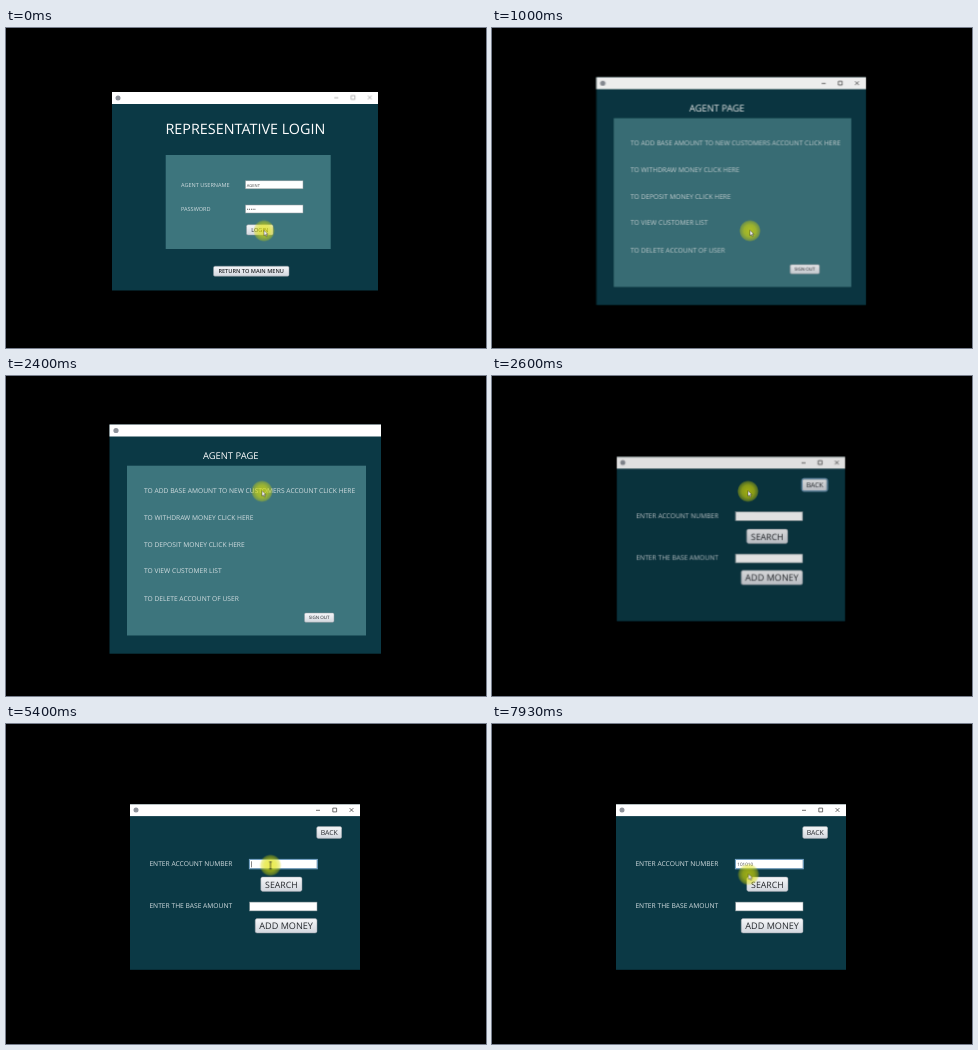
An HTML page that plays this animation: 480x320 px, repeating every 8000 ms.

```html
<!DOCTYPE html>
<html lang="en">
<head>
<meta charset="utf-8">
<title>Account desk</title>
<style>
  html, body { margin: 0; width: 100%; height: 100%; overflow: hidden; background: #000; }
  svg { display: block; width: 100vw; height: 100vh; }
  text { font-family: "Open Sans", "Noto Sans", sans-serif; fill: #d3dee1; text-rendering: geometricPrecision; }

  .body { fill: #0b3945; }
  .bar { fill: #fff; }
  .panel { fill: #3d757d; }
  .logo { fill: #8d929a; }
  .glyphs { fill: none; stroke: #333; stroke-width: .7; }
  .soft { stroke: #999; }
  .title { fill: #fff; }
  .field { fill: #fff; stroke: #8e979c; stroke-width: .5; }
  .ring { fill: none; stroke: #74a3c8; stroke-width: 1; }
  .button rect { fill: url(#face); stroke: #8c949d; stroke-width: .5; }
  .button text { fill: #25282c; text-anchor: middle; }
  .value { fill: #444; }

  /* One shared 8 s clock */
  .win, .run { animation: 8s linear infinite both; }
  .win { transform-box: fill-box; transform-origin: center; }
  .login { animation-name: login; }
  .menu { animation-name: menu; }
  .money { animation-name: money; }
  .step { animation-timing-function: step-end; }
  .loginGlyphs { animation-name: loginGlyphs; }
  .menuGlyphs { animation-name: menuGlyphs; }
  .blur { animation-name: blur; }
  .focus { animation-name: focus; }
  .type { animation-name: type; }
  .caret { animation-name: caret; }
  .pointer { animation-name: move; }
  .arrow { animation-name: arrow; }
  .beam { animation-name: beam; }

  @keyframes login {
    0%, 9.2% { opacity: 1; transform: none; }
    10.8%, 100% { opacity: 0; transform: scale(.94); }
  }
  @keyframes menu {
    0%, 10.8% { opacity: 0; transform: scale(.92); }
    12.5% { opacity: .93; transform: scale(.994); }
    13.375%, 30.2% { opacity: 1; transform: none; }
    31.7%, 100% { opacity: 0; transform: scale(.94); }
  }
  @keyframes money {
    0%, 30.8% { opacity: 0; transform: scale(.92); }
    32.5% { opacity: .88; transform: scale(.993); }
    34.2%, 100% { opacity: 1; transform: none; }
  }
  @keyframes loginGlyphs { 0% { opacity: 1; } 8.375%, 100% { opacity: 0; } }
  @keyframes menuGlyphs { 0% { opacity: 1; } 28.375%, 100% { opacity: 0; } }
  @keyframes blur { 0% { opacity: 1; } 45%, 100% { opacity: 0; } }
  @keyframes focus { 0% { opacity: 0; } 45%, 100% { opacity: 1; } }
  @keyframes type {
    0% { transform: none; }
    73.375% { transform: translateX(2.65px); }
    75.875% { transform: translateX(5.3px); }
    78.375% { transform: translateX(7.95px); }
    82.5% { transform: translateX(10.6px); }
    88.375% { transform: translateX(13.25px); }
    91.625%, 100% { transform: translateX(15.9px); }
  }
  @keyframes caret {
    0%, 48.375%, 60.875%, 98.375%, 100% { opacity: 0; }
    45%, 55%, 67.5% { opacity: 1; }
  }
  @keyframes move {
    0% { transform: translate(258px, 202.7px); }
    16.67% { transform: translate(258px, 202.7px); animation-timing-function: ease-in-out; }
    24.125% { transform: translate(256px, 115.3px); }
    35% { transform: translate(256px, 115.3px); animation-timing-function: ease-in-out; }
    40.875% { transform: translate(264.7px, 142px); }
    42.5%, 97.5% { transform: translate(264.5px, 141.3px); }
    98.375% { transform: translate(260.2px, 146px); }
    99.125%, 100% { transform: translate(256.5px, 150.5px); }
  }
  @keyframes arrow { 0%, 98.375%, 100% { opacity: 1; } 39.4% { opacity: 0; } }
  @keyframes beam { 0%, 98.375%, 100% { opacity: 0; } 39.4% { opacity: 1; } }
</style>
</head>
<body>
<svg viewBox="0 0 480 320" preserveAspectRatio="none">
  <defs>
    <linearGradient id="face" x2="0" y2="1">
      <stop offset="0" stop-color="#f6f7f9"/>
      <stop offset="1" stop-color="#d3d7de"/>
    </linearGradient>
    <radialGradient id="glow">
      <stop offset="0" stop-color="#e4e400" stop-opacity=".7"/>
      <stop offset=".55" stop-color="#dde000" stop-opacity=".6"/>
      <stop offset=".85" stop-color="#d4d800" stop-opacity=".38"/>
      <stop offset="1" stop-color="#d0d400" stop-opacity="0"/>
    </radialGradient>
    <path id="controls" d="M-2 .3h4M14.8-1.9h3.8v3.8h-3.8zM31.6-1.9l3.8 3.8m0-3.8l-3.8 3.8"/>
  </defs>
  <rect width="480" height="320"/>

  <g class="win login">
    <rect class="body" x="106" y="64" width="266" height="198.5"/>
    <rect class="bar" x="106" y="64" width="266" height="12"/>
    <circle class="logo" cx="112" cy="70" r="2.5"/>
    <use class="glyphs soft run step loginGlyphs" href="#controls" x="330.3" y="69.5"/>
    <text class="title" x="159.5" y="106.3" font-size="14.35">REPRESENTATIVE LOGIN</text>
    <rect class="panel" x="159.7" y="127" width="165" height="94"/>
    <g font-size="5.55">
      <text x="175" y="159.4">AGENT USERNAME</text>
      <text x="175" y="183.1">PASSWORD</text>
    </g>
    <rect class="field" x="239.5" y="152.8" width="57.5" height="8"/>
    <rect class="field" x="239.5" y="177" width="57.5" height="8"/>
    <text class="value" x="240.8" y="158.5" font-size="4.1">AGENT</text>
    <text class="value" x="240.8" y="182.8" font-size="4.8">•••••</text>
    <g class="button" font-size="5.6">
      <rect x="240.5" y="196.7" width="26.5" height="10.3" rx="1.5"/>
      <text x="253.7" y="204">LOGIN</text>
      <rect x="207.5" y="238.2" width="75.5" height="10" rx="1.5"/>
      <text x="245.2" y="245.3" font-weight="600">RETURN TO MAIN MENU</text>
    </g>
  </g>

  <g class="win menu">
    <rect class="body" x="103.5" y="48.5" width="271.5" height="229.2"/>
    <rect class="bar" x="103.5" y="48.5" width="271.5" height="12"/>
    <circle class="logo" cx="110" cy="54.5" r="2.6"/>
    <use class="glyphs run step menuGlyphs" href="#controls" x="332.2" y="54.5"/>
    <text class="title" x="197" y="82.6" font-size="9.4">AGENT PAGE</text>
    <rect class="panel" x="121" y="89.7" width="239" height="169.8"/>
    <g font-size="6.68">
      <text x="138" y="117.4">TO ADD BASE AMOUNT TO NEW CUSTOMERS ACCOUNT CLICK HERE</text>
      <text x="138" y="143.7">TO WITHDRAW MONEY CLICK HERE</text>
      <text x="138" y="171.3">TO DEPOSIT MONEY CLICK HERE</text>
      <text x="138" y="197.4">TO VIEW CUSTOMER LIST</text>
      <text x="138" y="224.6">TO DELETE ACCOUNT OF USER</text>
    </g>
    <g class="button" font-size="4.5">
      <rect x="298.5" y="237" width="29.5" height="9.3" rx="1.4"/>
      <text x="313.2" y="243.4">SIGN OUT</text>
    </g>
  </g>

  <g class="win money">
    <rect class="body" x="124" y="80.3" width="230" height="165.5"/>
    <rect class="bar" x="124" y="80.3" width="230" height="11.8"/>
    <circle class="logo" cx="130" cy="86" r="2.5"/>
    <use class="glyphs" href="#controls" x="312" y="86"/>
    <g font-size="6.69">
      <text x="143.4" y="142">ENTER ACCOUNT NUMBER</text>
      <text x="143.4" y="184.3">ENTER THE BASE AMOUNT</text>
    </g>
    <rect class="field" x="243.7" y="135.7" width="67.3" height="8.8"/>
    <rect class="field" x="243.7" y="178.1" width="67.3" height="8.8"/>
    <text class="value" x="245.3" y="141.8" font-size="4.63">101010</text>
    <g class="run step type">
      <rect x="245.2" y="136.6" width="17.5" height="7" fill="#fff"/>
      <path class="run step caret" d="M245.4 137.3v6" stroke="#222" stroke-width=".6"/>
    </g>
    <rect class="ring run step focus" x="243.4" y="135.4" width="67.9" height="9.4"/>
    <g class="button">
      <rect x="310.7" y="102.6" width="25" height="11.8" rx="1.6"/>
      <text x="323.2" y="111" font-size="6.9">BACK</text>
      <rect x="254.8" y="153" width="41.2" height="14.4" rx="1.8"/>
      <text x="275.4" y="163.5" font-size="8.75">SEARCH</text>
      <rect x="249.2" y="194.6" width="61.8" height="14.4" rx="1.8"/>
      <text x="280.1" y="205.1" font-size="9.1">ADD MONEY</text>
    </g>
    <rect class="ring run step blur" x="310.3" y="102.2" width="25.8" height="12.6" rx="1.9"/>
  </g>

  <g class="run pointer">
    <circle r="11" fill="url(#glow)"/>
    <path class="run step arrow" d="M0-.5v5.4l1.3-1.2.9 2 .9-.4-.9-1.9h1.7z"
      fill="#fff" stroke="#222" stroke-width=".45"/>
    <path class="run step beam" d="M-1.3-3.3h2.6M0-3.3v7M-1.3 3.7h2.6"
      fill="none" stroke="#222" stroke-width=".7"/>
  </g>
</svg>
</body>
</html>
```
